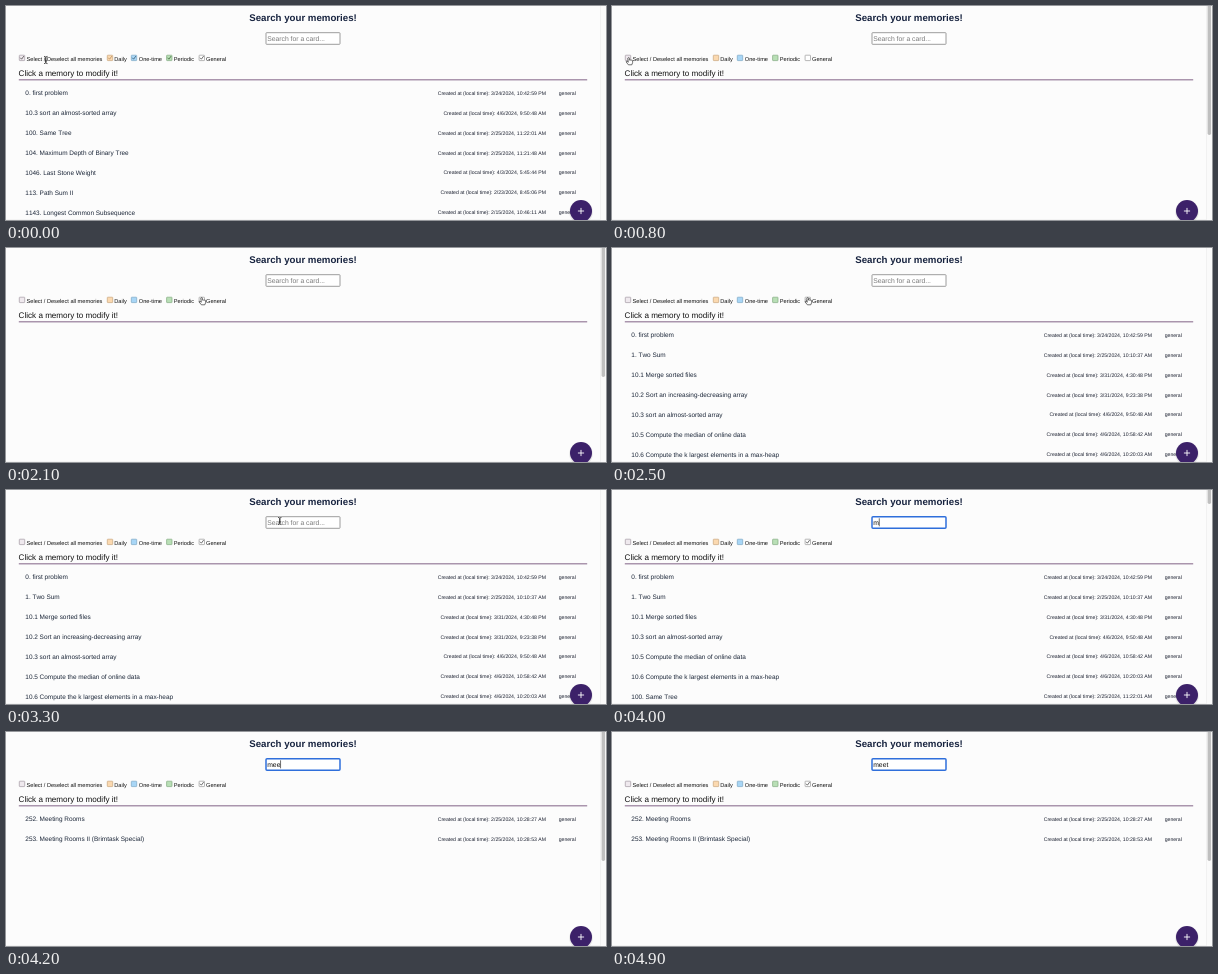
Recreate the animation shown at these times as an HTML page. Size 600 px wide and 214 px high, loop 5000 ms.

```html
<!DOCTYPE html>
<html lang="en">
<head>
<meta charset="utf-8">
<title>Search your memories!</title>
<style>
html, body { margin: 0; height: 100%; overflow: hidden; background: #fcfcfc; }
svg { display: block; width: 100vw; height: 100vh; }
text {
  font-family: "Liberation Sans", Arial, sans-serif;
  font-kerning: none;
  text-rendering: geometricPrecision;
  white-space: pre;
}
</style>
</head>
<body>
<svg id="stage" viewBox="0 0 600 214"></svg>
<script>
const LOOP = 5000, STEP = 100;
const stage = document.getElementById('stage');

const cards = `0. first problem|3/24/2024, 10:42:59 PM
1. Two Sum|2/25/2024, 10:10:37 AM
10.1 Merge sorted files|3/31/2024, 4:30:48 PM
10.2 Sort an increasing-decreasing array|3/31/2024, 9:23:38 PM
10.3 sort an almost-sorted array|4/6/2024, 9:50:48 AM
10.5 Compute the median of online data|4/6/2024, 10:58:42 AM
10.6 Compute the k largest elements in a max-heap|4/6/2024, 10:20:03 AM
100. Same Tree|2/25/2024, 11:22:01 AM
104. Maximum Depth of Binary Tree|2/25/2024, 11:21:48 AM
1046. Last Stone Weight|4/3/2024, 5:45:44 PM
113. Path Sum II|2/23/2024, 8:45:06 PM
1143. Longest Common Subsequence|2/15/2024, 10:46:11 AM
121. Best Time to Buy and Sell Stock|2/25/2024, 10:11:29 AM
125. Valid Palindrome|2/25/2024, 10:20:28 AM
1306. Jump Game III|7/5/2024, 4:38:06 PM
252. Meeting Rooms|2/25/2024, 10:28:27 AM
253. Meeting Rooms II (Brimtask Special)|2/25/2024, 10:28:53 AM`
  .split('\n').map(line => line.split('|'));
const firstView = [cards[0], cards[4], ...cards.slice(7)];

// x, label x, label, fill, edge, tick
const filters = [
  [13, 20.5, 'Select / Deselect all memories', '#efe9ee', '#a39aa3', '#4a4a4a'],
  [101, 108.3, 'Daily', '#fbd9b0', '#c9a57c', '#b98f60'],
  [125, 132.8, 'One-time', '#a8d6f6', '#7ba6c4', '#35586f'],
  [160.3, 167.8, 'Periodic', '#b9dfb6', '#82ab80', '#3f6a3e'],
  [192.8, 200, 'General', '#ffffff', '#989898', '#4a4a4a']
];

// start, end, from, to
const moves = [
  [100, 600, [39.8, 54], [17, 54.5]],
  [1300, 2100, [17, 54.5], [196, 52.5]],
  [2900, 3300, [196, 52.5], [273.8, 31]]
];

const typed = [[3900, 'm'], [4100, 'me'], [4200, 'mee'], [4400, 'meet']];

const text = (x, y, size, str, fill = '#111', extra = '') =>
  `<text x="${x}" y="${y}" font-size="${size}" fill="${fill}" ${extra}>${str}</text>`;
const rect = (x, y, w, h, fill, extra = '') =>
  `<rect x="${x}" y="${y}" width="${w}" height="${h}" fill="${fill}" ${extra}/>`;
const path = (d, fill, stroke, width) =>
  `<path d="${d}" fill="${fill}" stroke="${stroke}" stroke-width="${width}" stroke-linejoin="round" stroke-linecap="round"/>`;

function pointer(t) {
  let pos = moves[0][2];
  for (const [start, end, a, b] of moves) {
    if (t < start) break;
    const p = Math.min(1, (t - start) / (end - start));
    const e = p * p * (3 - 2 * p);
    pos = a.map((v, i) => v + (b[i] - v) * e);
  }
  return pos;
}

function cursor([x, y]) {
  const overBox = y > 47 && filters.some(f => x >= f[0] && x < f[0] + 7);
  const overText = y > 49 && x < 221 || x > 260 && y < 39;
  let shape;
  if (overBox) {
    shape = path('M-1-2.6q.7-.9 1.3 0v2.2q.7-.5 1.2 0q.7-.4 1.1.1q.9-.2 1 .7v1.8l-.8 2.1h-3.4l-2.2-2.8q-.2-1 .8-.7l1 .7z', '#fff', '#222', .65);
  } else if (overText) {
    const bar = 'M-1.4-3.6q1.4 0 1.4 1v5.2q0 1-1.4 1M1.4-3.6q-1.4 0-1.4 1v5.2q0 1 1.4 1M-.8.9h1.6';
    shape = path(bar, 'none', '#fff', 1.5) + path(bar, 'none', '#222', .75);
  } else {
    shape = path('M-1-3v6.4l1.5-1.4 1 2.3 1-.4-1-2.2h2z', '#111', '#fff', .6);
  }
  return `<g transform="translate(${x} ${y})">${shape}</g>`;
}

function checkbox([x, labelX, label, fill, edge, tick], on) {
  return rect(x + .3, 49.2, 5.4, 5.4, fill, `stroke="${edge}" stroke-width=".7" rx=".5"`) +
    (on ? path(`M${x + 1.5} 52l1.1 1.2 2-2.8`, 'none', tick, .8) : '') +
    text(labelX, 54.5, 5.65, label);
}

function cardRow([title, date], i) {
  const y = 89.4 + i * 19.85;
  return text(19.3, y, 6.45, title, '#1b2638') +
    text(540, y - .4, 5.15, 'Created at (local time): ' + date, '#1b2030', 'text-anchor="end"') +
    text(552.7, y - .4, 5.15, 'general', '#1b2030');
}

function searchBox(t, query) {
  const focused = t >= 3500;
  const caretAge = t - (typed.findLast(k => t >= k[0])?.[0] ?? 3500);
  const caretX = 261.2 + 6.8 * [0, .833, 1.389, 1.945, 2.223][query.length];
  return rect(260, 26.7, 74, 11.6, '#fff', focused
      ? 'stroke="#2f6fdb" stroke-width="1.5" rx="1"'
      : 'stroke="#858585" stroke-width=".8" rx=".6"') +
    (query ? text(261.2, 35, 6.8, query) : text(261.2, 35, 6.8, 'Search for a card...', '#7b7b7b')) +
    (focused && caretAge < 500 ? rect(caretX, 28.3, .6, 8, '#111') : '');
}

function draw(t) {
  const query = typed.findLast(k => t >= k[0])?.[1] ?? '';
  const empty = t >= 800 && t < 2500;
  const rows = t < 800 ? firstView : empty ? [] : cards.filter(c => c[0].toLowerCase().includes(query));
  const thumb = rows.length < 3 ? 129 : { m: 14, me: 46 }[query] || 0;

  stage.innerHTML =
    rect(0, 0, 600, 214, '#fcfcfc') +
    text(297, 15, 9.68, 'Search your memories!', '#17233f', 'font-weight="700" text-anchor="middle"') +
    searchBox(t, query) +
    filters.map((f, i) => checkbox(f, t < 800 || i === 4 && !empty)).join('') +
    text(12.6, 70.4, 8.1, 'Click a memory to modify it!') +
    rect(12.8, 73.4, 568.4, .9, '#76537b') +
    rows.slice(0, 7).map(cardRow).join('') +
    rect(0, 213.4, 594, .6, '#eeeeee') +
    rect(594, 0, 6, 214, '#fafafa') + rect(594, 0, .5, 214, '#e8e8e8') +
    (thumb ? rect(595.6, -6, 3.5, thumb + 6, '#bfbfbf', 'rx="1.7"') : '') +
    '<circle cx="575" cy="206" r="11.8" fill="#000" opacity=".08"/>' +
    '<circle cx="575" cy="205" r="11" fill="#3c2169"/>' +
    path('M572.3 205h5.4M575 202.3v5.4', 'none', '#fff', .9) +
    (t < 3900 ? cursor(pointer(t)) : '');
}

let last = -1;
function tick(now) {
  const t = Math.floor(now % LOOP / STEP) * STEP;
  if (t !== last) draw(last = t);
  requestAnimationFrame(tick);
}
draw(0);
requestAnimationFrame(tick);
</script>
</body>
</html>
```
